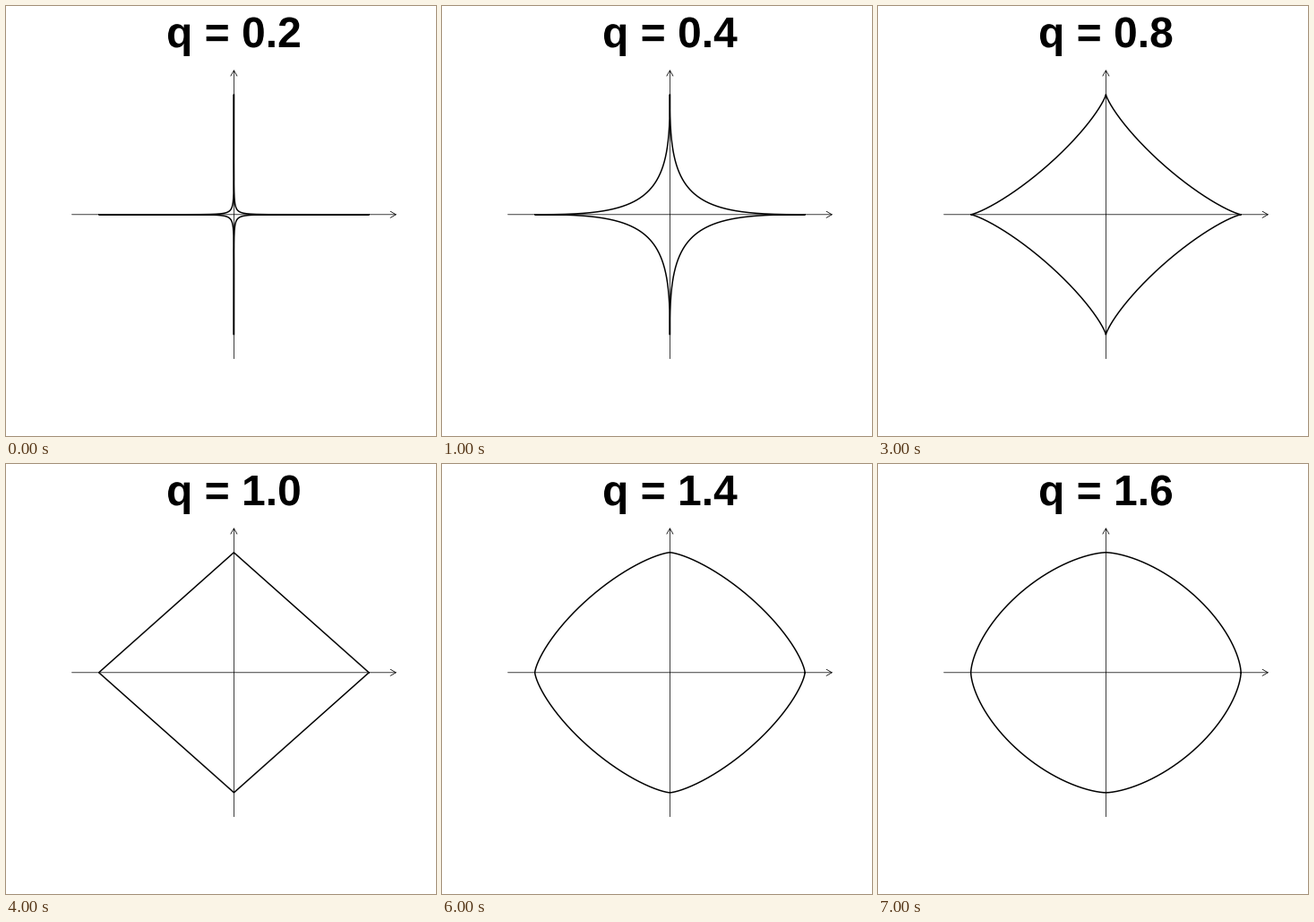
A matplotlib script that plays this animation: 480x480 px, repeating every 8000 ms.

```python
import numpy as np
import matplotlib.pyplot as plt
from matplotlib.animation import FuncAnimation
from matplotlib.patches import PathPatch
from matplotlib.textpath import TextPath

SIZE = 480
CX, CY = 254.4, SIZE - 232.8      # origin of the axes, y pointing up
RX, RY = 150.74, 134.07           # pixels per unit
REACH = 1.2
HEAD = 7.2                        # length of an arrowhead barb
TITLE_FONT = {"family": "Liberation Sans", "weight": "bold"}
PX = 0.75                         # points per pixel at 96 dpi

fig = plt.figure(figsize=(5, 5), dpi=96, facecolor="white")
ax = fig.add_axes([0, 0, 1, 1])
ax.set_xlim(0, SIZE)
ax.set_ylim(0, SIZE)
ax.axis("off")


def stroke(xs, ys, width):
    line, = ax.plot(xs, ys, color="black", lw=width * PX, snap=False,
                    solid_capstyle="round", solid_joinstyle="round")
    return line


def arrow(dx, dy):
    """Axis through the origin with an open head at its positive end."""
    tip = np.array([CX + dx, CY + dy])
    stroke([CX - dx, tip[0]], [CY - dy, tip[1]], 0.75)
    angle = np.arctan2(dy, dx)
    barbs = [tip - HEAD * np.array([np.cos(a), np.sin(a)])
             for a in (angle - np.pi / 6, angle + np.pi / 6)]
    xs, ys = zip(barbs[0], tip, barbs[1])
    stroke(xs, ys, 0.75)


def unit_ball(q):
    """Points of |x|^q + |y|^q = 1 in pixels."""
    t = np.linspace(0, 2 * np.pi, 1601)
    c, s = np.cos(t), np.sin(t)
    x = np.sign(c) * np.abs(c) ** (2 / q)
    y = np.sign(s) * np.abs(s) ** (2 / q)
    return CX + RX * x, CY + RY * y


def title_path(q):
    return TextPath((179, SIZE - 46), f"q = {q:.1f}", size=48, prop=TITLE_FONT)


arrow(REACH * RX, 0)
arrow(0, REACH * RY)
curve = stroke([], [], 1.5)
title = ax.add_patch(PathPatch(title_path(0.2), fc="black", lw=0, snap=False))


def update(i):
    q = 0.2 * (i + 1)
    curve.set_data(*unit_ball(q))
    title.set_path(title_path(q))
    return curve, title


anim = FuncAnimation(fig, update, frames=8, interval=1000, repeat=True,
                     repeat_delay=0)
plt.show()
```
